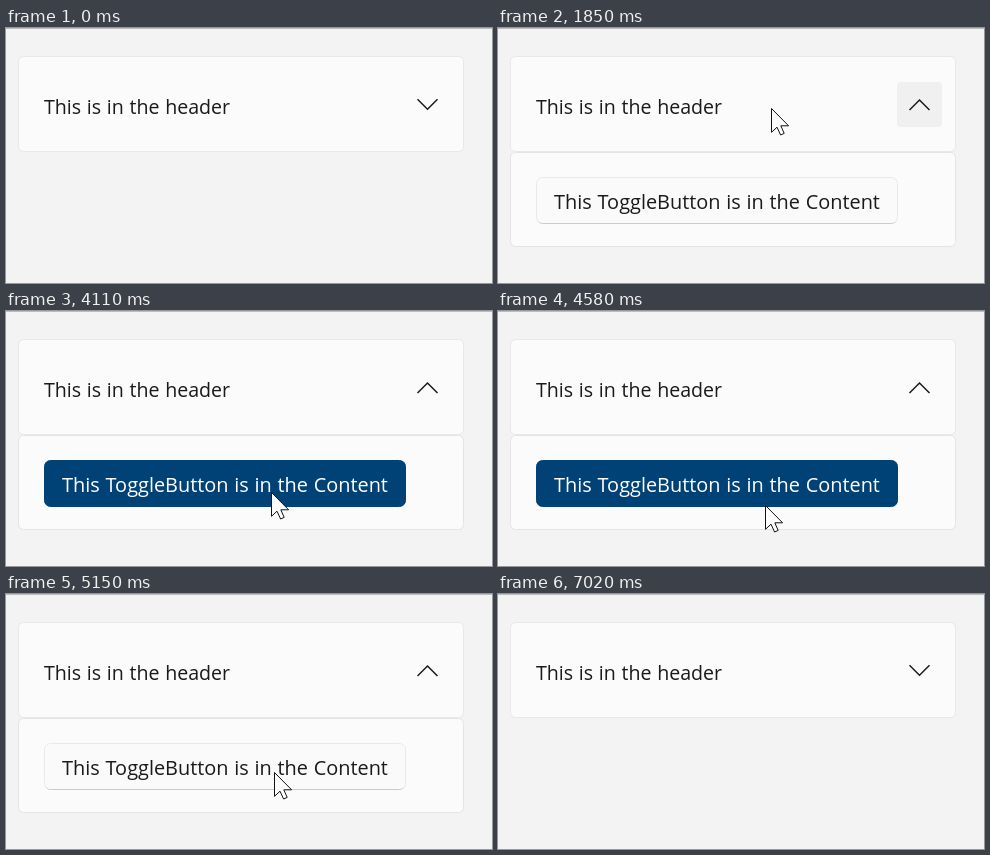
Recreate the animation shown at these times as an HTML page. Size 486x255 px, loop 8.02 s.

```html
<!DOCTYPE html>
<html lang="en">
<head>
<meta charset="utf-8">
<title>Expander</title>
<style>
html, body { margin: 0; width: 100%; height: 100%; overflow: hidden; background: #f3f3f3; }
svg { display: block; width: 486px; height: 255px; }
text { font-family: "Open Sans", "Noto Sans", sans-serif; fill: #1a1a1a; word-spacing: .6px; }
.card { fill: #fbfbfb; stroke: #e8e8e8; }
</style>
</head>
<body>
<svg viewBox="0 0 486 255">
  <defs>
    <clipPath id="below"><path d="M0 124H486V255H0Z"/></clipPath>
    <linearGradient id="edge" x1="0" y1="0" x2="0" y2="1">
      <stop offset=".93" stop-color="#e9e9e9"/>
      <stop offset="1" stop-color="#cbcbcb"/>
    </linearGradient>
  </defs>
  <path d="M0 .5H486" stroke="#bcbcbc"/>
  <g clip-path="url(#below)">
    <g id="content">
      <rect class="card" x="12.5" y="124.5" width="445" height="94" rx="5" style="stroke:#e4e4e4"/>
      <rect id="button" x="38.5" y="149.5" width="361" height="46" rx="6"/>
      <text id="label" x="56" y="181" font-size="19.9">This ToggleButton is in the Content</text>
    </g>
  </g>
  <rect class="card" x="12.5" y="28.5" width="445" height="95" rx="5"/>
  <text x="38" y="86" font-size="19.6">This is in the header</text>
  <rect id="hover" x="399" y="54" width="45" height="45" rx="4" fill="#f0f0f0"/>
  <path id="chevron" fill="none" stroke="#1a1a1a" stroke-width="1.5"/>
  <circle id="press" r="18" fill="#ff0" fill-opacity=".5"/>
  <path id="cursor" d="M.5 .5V24.3L6 19.2L9.6 27L13.2 25.4L9.8 17.8H17.6Z" fill="#fff" stroke="#111"/>
</svg>
<script>
const LOOP = 8020;
const $ = id => document.getElementById(id);
const within = (t, a, b) => t >= a && t < b;
const linear = p => p;
const easeIn = p => p * p;
const easeOut = p => 1 - (1 - p) ** 2;
const easeBoth = p => p * p * (3 - 2 * p);

// start, end, steps, from, to, easing
const moves = [
  [920, 1382, 7, [286, 199], [273, 80], easeOut],
  [2230, 2860, 9, [273, 80], [265, 179], easeBoth],
  [4110, 4350, 4, [265, 179], [267, 203], easeIn],
  [4580, 4890, 5, [267, 203], [268, 178], easeOut],
  [5690, 6170, 7, [268, 178], [260, 74], easeBoth],
  [6700, 7020, 5, [260, 74], [272, 262], easeIn],
];
const clicks = [[1450, 1540], [3090, 3160], [5060, 5150], [6400, 6470]];

function pointer(t) {
  const move = moves.filter(m => t >= m[0]).pop();
  if (!move || t >= 7020) return null;
  const [start, end, steps, from, to, ease] = move;
  const step = Math.floor((t - start) / (end - start) * (steps - 1) + 1e-6) + 1;
  const p = ease(Math.min(1, step / steps));
  return from.map((v, i) => Math.round(v + (to[i] - v) * p));
}

function slide(t) {
  const at = [1540, 1620, 1690, 1770, 1850].filter(s => t >= s).pop();
  const u = Math.cbrt(Math.min(1, (at - 1517) / 333));
  return 3 * (1 - u) * u * u + u ** 3;
}

function show(id, on) { $(id).setAttribute("visibility", on ? "visible" : "hidden"); }

function draw(t) {
  const tip = pointer(t);
  const pressed = clicks.some(c => within(t, ...c));
  const open = within(t, 1540, 6470);
  const checked = within(t, 3160, 5150);
  const overHeader = tip && tip[1] > 28 && tip[1] < 124;
  const overButton = tip && tip[1] > 149 && tip[1] < 196;

  show("content", open);
  if (open) $("content").setAttribute("transform", `translate(0 ${-95 * (1 - slide(t))})`);
  $("chevron").setAttribute("d", open ? "M411.5 82L421.5 72L431.5 82" : "M411.5 71.2L421.5 81.2L431.5 71.2");
  show("hover", overHeader);

  const down = pressed && overButton;
  const accent = down ? "#002642" : overButton ? "#004275" : "#005a9e";
  $("button").setAttribute("fill", checked ? accent : "#fafafa");
  $("button").setAttribute("stroke", checked ? accent : "url(#edge)");
  $("label").style.fill = checked ? (down ? "#c8d0d8" : "#fff") : down ? "#5e5e5e" : "#1a1a1a";

  show("cursor", tip);
  show("press", pressed);
  if (tip) for (const id of ["cursor", "press"]) $(id).setAttribute("transform", `translate(${tip})`);
}

function frame() {
  draw(performance.now() % LOOP);
  requestAnimationFrame(frame);
}
frame();
</script>
</body>
</html>
```
